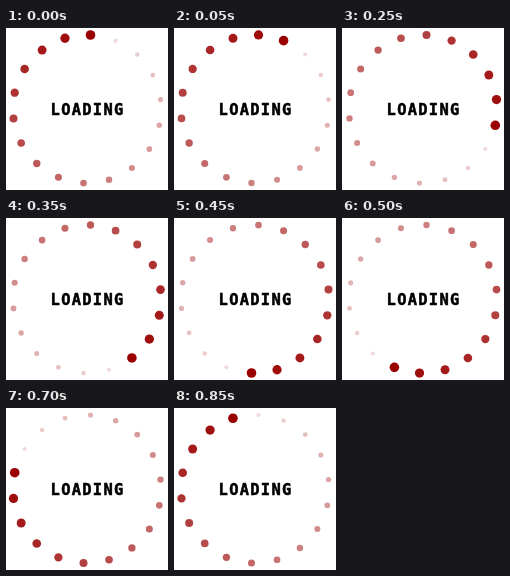
These frames come from a looping animation (162 by 162 pixels, 0.9 s). An HTML page:

```html
<!DOCTYPE html>
<html lang="en">
<head>
<meta charset="utf-8">
<title>Loading</title>
<style>
  html, body { margin: 0; height: 100%; overflow: hidden; background: #fff; }
  svg { display: block; width: 100vw; height: 100vh; }
  circle { fill: #9a0000; }
  text {
    font: bold 15.4px "DejaVu Sans Mono", monospace;
    letter-spacing: 1.3px;
    text-anchor: middle;
    stroke: #000;
    stroke-width: .5px;
  }
</style>
</head>
<body>
<svg viewBox="0 0 162 162">
  <g id="ring"></g>
  <text x="81.6" y="87">LOADING</text>
</svg>
<script>
  const COUNT = 18, STEP = 50, CENTER = 81, RADIUS = 74.1, START = 2.7;
  const ring = document.getElementById('ring');

  const dots = Array.from({ length: COUNT }, (_, i) => {
    const angle = (START + i * 360 / COUNT) * Math.PI / 180;
    const dot = document.createElementNS('http://www.w3.org/2000/svg', 'circle');
    dot.setAttribute('cx', CENTER + RADIUS * Math.sin(angle));
    dot.setAttribute('cy', CENTER - RADIUS * Math.cos(angle));
    return ring.appendChild(dot);
  });

  // The head jumps one dot per step; dots shrink and fade with age.
  function draw() {
    const head = Math.floor(performance.now() / STEP) % COUNT;
    dots.forEach((dot, i) => {
      const age = (head - i + COUNT) % COUNT / COUNT;
      dot.setAttribute('r', 4.8 - 2.9 * age);
      dot.setAttribute('opacity', 1 - 0.9 * age);
    });
    requestAnimationFrame(draw);
  }
  draw();
</script>
</body>
</html>
```
